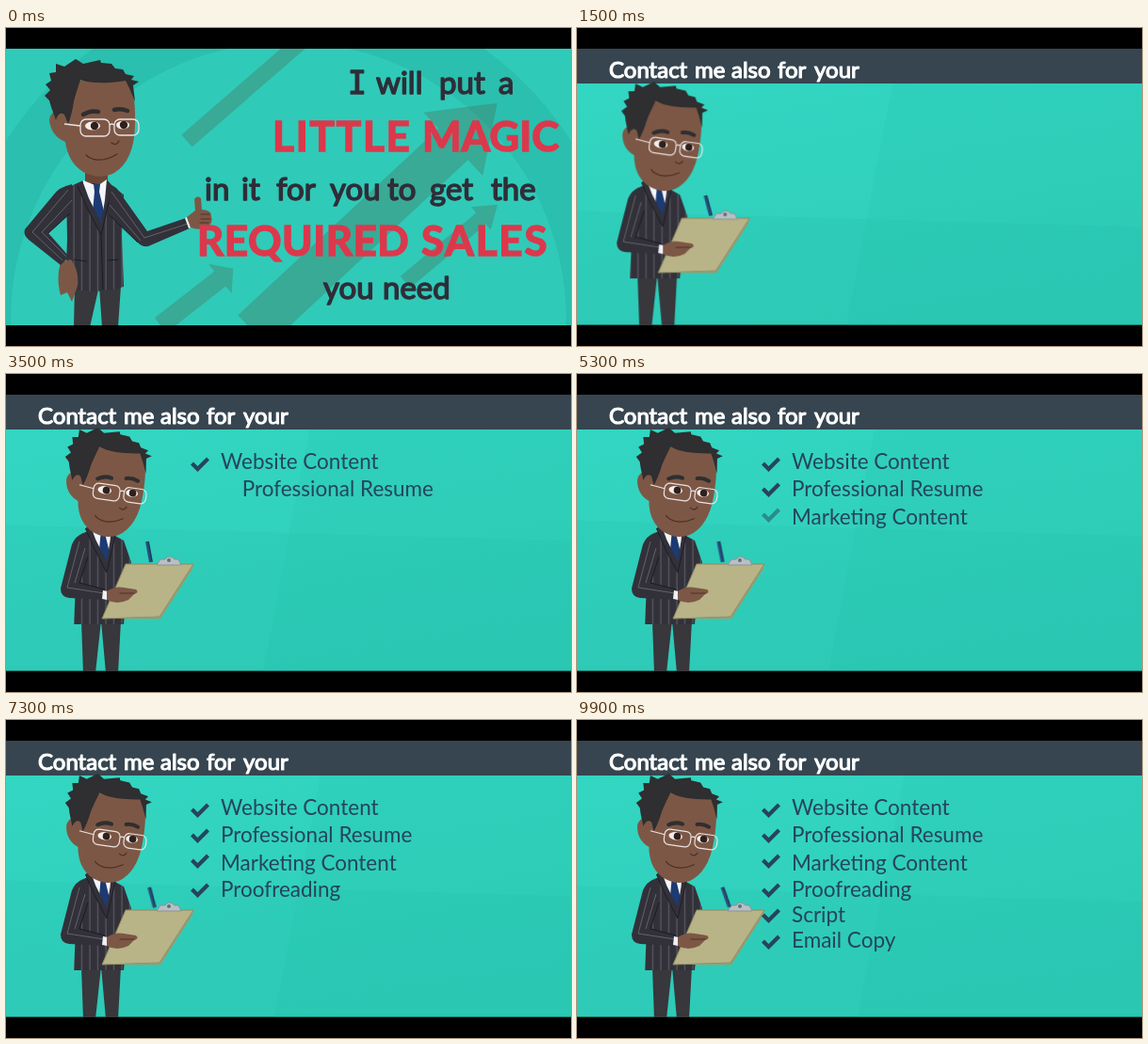
Write an HTML page that moves like this. It is 600 px wide and 338 px high and loops after 10000 ms.

```html
<!DOCTYPE html>
<html lang="en">
<head>
<meta charset="utf-8">
<title>Contact me</title>
<style>
html, body { margin: 0; width: 100%; height: 100%; overflow: hidden; background: #000; }
svg { display: block; width: 100vw; height: 100vh; --t: 0; }
text { font-family: Lato, sans-serif; }

.skin { fill: #7d5745; }
.neck { fill: #694637; }
.hair { fill: #2f2e30; }
.suit { fill: #32313a; }
.legs { fill: #37373c; }
.line { fill: none; stroke: #9a9aa3; stroke-width: .8; opacity: .6; }
.edge { fill: none; stroke: #1b1b22; stroke-width: 1; }
.crease { fill: none; stroke: #4b3026; stroke-width: 1.3; stroke-linecap: round; }
.brow { fill: none; stroke: #2f2e30; stroke-width: 4.5; stroke-linecap: round; }
.specs { fill: none; stroke: #e9e4e2; stroke-width: 1.3; }

/* marker-like lettering */
.hand { stroke-width: 1.5; stroke-linejoin: round; stroke-linecap: round; }
.dark { fill: #2f2e38; stroke: #2f2e38; font-size: 33px; }
.white { fill: #fff; stroke: #fff; font-size: 24px; stroke-width: 1.2; }
.serif { font-family: "DejaVu Sans Mono", monospace; font-size: 33px; }
.loud { fill: #dc384c; stroke: #dc384c; stroke-width: 1.5; font-size: 44px; font-weight: 700; }
.row { fill: #26455a; font-size: 22.5px; }
.tick { fill: none; stroke: #26455a; stroke-width: 4.2; }

/* every animation is paused and placed by --t */
.opening, .title, .writer, .pen, .shade, .floor, .row, .tick {
  animation: 10s linear calc((var(--s, 0) - var(--t)) * 1ms) both paused;
}
.opening { --s: 500; animation-name: leave; animation-duration: .5s; }
.title { --s: 600; animation-name: show; animation-duration: .4s; }
.writer { --s: 1150; animation-name: enter; animation-duration: .6s; }
.pen { animation-name: scribble; animation-duration: 1.45s; animation-iteration-count: infinite; }
.shade { animation-name: sway; }
.floor { animation-name: bob; }
.row { animation-name: slide; animation-duration: .55s; }
.tick { animation-name: show; animation-duration: .3s; }

@keyframes leave { to { opacity: 0; } }
@keyframes enter {
  from { transform: translate(-200px, 2px); animation-timing-function: cubic-bezier(.215, .61, .355, 1); }
  to { transform: none; }
}
@keyframes slide {
  from { transform: translateX(400px); animation-timing-function: cubic-bezier(.215, .61, .355, 1); }
  to { transform: none; }
}
@keyframes show { from { opacity: 0; } }
@keyframes scribble {
  0%, 8%, 100% { transform: translate(8px, -1px) rotate(-9deg); }
  40%, 85% { transform: none; }
}
@keyframes sway {
  0%, 15% { transform: translateX(5px); }
  35% { transform: translateX(-8px); }
  53% { transform: translateX(-14px); }
  73% { transform: translateX(4px); }
  100% { transform: translateX(18px); }
}
@keyframes bob {
  0%, 15% { transform: translateY(34px); }
  35% { transform: none; }
  53% { transform: translateY(-5px); }
  73% { transform: translateY(10px); }
  100% { transform: translateY(16px); }
}
</style>
</head>
<body>
<svg id="stage" viewBox="0 0 600 338" preserveAspectRatio="none">
  <defs>
    <linearGradient id="teal" x1="0" y1="0" x2=".3" y2="1">
      <stop offset="0" stop-color="#33d8c3"/>
      <stop offset="1" stop-color="#30cdb9"/>
    </linearGradient>
    <pattern id="pin" width="8.5" height="20" patternUnits="userSpaceOnUse">
      <rect class="suit" width="8.5" height="20"/>
      <path class="line" d="M4 0V20"/>
    </pattern>
    <clipPath id="frame"><rect y="22" width="600" height="293.500"/></clipPath>
    <path id="arrow" d="M0 -.1H.82V-.2L1 0L.82 .2V.1H0Z"/>

    <g id="head">
      <path class="skin" d="M64 56L131 54Q138 72 137 104Q136 141 115 154Q99 162 82 153Q66 143 63 121Q48 115 46 98Q48 84 62 90Z"/>
      <path class="hair" d="M53 98L48 84L46 77L41 72L47 66L42 60L48 56L46 48L53 47L53 38L62 41L74 33L82 38L100 34L101 37L112 38L116 43L124 44L127 49L136 51L133 55L141 57L135 61L137 78L131 64L127 56Q96 61 79 55Q74 70 72 78Q70 92 66 102L62 92Q56 88 53 98Z"/>
      <path class="brow" d="M82 92Q90 87 98 89M115 87Q122 85 129 88"/>
      <ellipse cx="92" cy="104" rx="8" ry="4.6" fill="#f3eeeb"/>
      <ellipse cx="124" cy="103" rx="7" ry="4.6" fill="#f3eeeb"/>
      <circle cx="94" cy="104" r="4.2" fill="#30201d"/>
      <circle cx="125" cy="103" r="4.2" fill="#30201d"/>
      <path class="skin" d="M83 103Q92 95 101 102L101 98H83ZM116 102Q124 95 132 102V97H116Z"/>
      <rect class="specs" x="79" y="97" width="31" height="18" rx="6"/>
      <rect class="specs" x="115" y="97" width="26" height="17" rx="6"/>
      <path class="specs" d="M110 103Q112.500 101 115 103M79 104L62 102"/>
      <path class="crease" d="M112 122Q117 126 120 120M85 135Q89 139 96 140Q107 141 118 134"/>
    </g>

    <g id="collar">
      <path fill="#f4f5f8" d="M82 162L97 168L107 161L111 173L101 208L80 171Z"/>
      <path fill="#1d3b73" d="M93 166H100L99 174L105 199L100 209L92 195L94 174Z"/>
      <path class="suit" d="M81 162L76 168L86 191L101 220V207L88 181Z"/>
      <path class="suit" d="M107 161L113 168L108 190L101 220V207L105 183Z"/>
      <path class="edge" d="M76 168L86 191L101 220L108 190L113 168"/>
    </g>
  </defs>

  <g clip-path="url(#frame)">
    <rect width="600" height="338" fill="url(#teal)"/>
    <path class="shade" d="M337 22L277 338H660V22Z" fill="#20b8a5" opacity=".13"/>
    <path class="floor" d="M-20 160L620 178V360H-20Z" fill="#20b8a5" opacity=".16"/>
    <rect y="22" width="600" height="37" fill="#36454f"/>

    <g class="writer">
      <path class="legs" d="M80 262H101L95 318H82ZM101 262H122L119 318H106Z"/>
      <path class="neck" d="M89 155H113V172L102 184L90 172Z"/>
      <path fill="url(#pin)" d="M84 168L76 174Q70 195 74 225L72 266H125L128 230L133 200L125 177L112 170Z"/>
      <use href="#collar" transform="translate(16 13) scale(.9)"/>
      <path fill="#b8b487" stroke="#8e8a63" d="M127 202H199L163 258L102 260Z"/>
      <path fill="#9c986e" d="M102 260L163 258L199 202L198 207L164 260Z"/>
      <path fill="#b9c0c3" stroke="#8a9397" d="M160 203L164 197H169Q173 191 179 197H183L186 203Z"/>
      <circle cx="173" cy="198" r="2" fill="#5f7378"/>
      <g class="pen" style="transform-origin:153px 201px">
        <path d="M150 178L154 200" fill="none" stroke="#27517d" stroke-width="4"/>
        <path d="M151 178L155 199" fill="none" stroke="#193657" stroke-width="1"/>
      </g>
      <path class="suit" d="M82 169Q74 172 70 181L58 228Q58 237 67 238L104 240L106 229L78 222L87 194Z"/>
      <path class="line" d="M78 178L65 227L104 233M84 185L73 222"/>
      <path class="edge" d="M87 194L78 222L105 229"/>
      <path fill="#eef0f3" d="M103 230L108 231L107 240L102 239Z"/>
      <path class="skin" d="M107 231Q116 225 125 227L138 229Q142 232 136 234L130 240Q118 246 107 240Z"/>
      <path class="crease" d="M121 233L136 233" opacity=".6"/>
      <use href="#head" transform="translate(35 18) rotate(8) scale(.91)"/>
    </g>

    <g id="list"></g>

    <g class="opening">
      <rect width="600" height="338" fill="#30cab8"/>
      <circle cx="300" cy="310" r="325" fill="none" stroke="#178f86" stroke-width="60" opacity=".2"/>
      <g fill="#47735c" opacity=".36">
        <use href="#arrow" transform="translate(262 322) rotate(-43) scale(355 230)"/>
        <use href="#arrow" transform="translate(192 120) rotate(-41) scale(230 85)"/>
        <use href="#arrow" transform="translate(164 316) rotate(-38) scale(98 100)"/>
        <use href="#arrow" transform="translate(424 270) rotate(-40) scale(128 80)"/>
      </g>

      <path class="legs" d="M73 274H99L89 318H72ZM99 274H122L119 318H102Z"/>
      <path class="neck" d="M84 148H108V168L96 181L84 168Z"/>
      <path fill="url(#pin)" d="M80 163L64 170L65 225L63 276Q95 284 125 275L123 220L125 177L112 168Z"/>
      <use href="#collar"/>
      <path class="edge" d="M101 220L103 278M72 246L86 248M108 247L119 246"/>
      <path class="skin" d="M58 249L69 246Q78 258 76 274L70 291L65 281L58 284Q53 266 58 249Z"/>
      <path class="suit" d="M70 166Q56 169 50 178L20 214Q18 220 24 225L58 252L67 243L45 218L68 197Z"/>
      <path class="line" d="M66 172L28 217L60 247M70 183L38 217L64 243"/>
      <path class="suit" d="M109 166Q118 168 123 178L150 216L191 202L195 213L151 232Q144 233 140 228L110 199Z"/>
      <path class="line" d="M112 174L147 223L193 208M110 188L143 226"/>
      <path class="edge" d="M68 197L45 218M110 199L140 228"/>
      <path fill="#eef0f3" d="M190 202L192 201L196 212L194 213Z"/>
      <path class="skin" d="M192 201L201 194L200 182Q203 177 207 181L208 193Q219 194 218 200Q220 208 214 211Q205 216 196 212Z"/>
      <path class="crease" d="M207 198H216M207 203H217M206 207H215" opacity=".6"/>
      <use href="#head"/>

      <text class="hand dark" y="70"><tspan class="serif" x="363">I</tspan> <tspan x="393">will</tspan> <tspan x="460">put</tspan> <tspan x="523">a</tspan></text>
      <text class="loud" y="131"><tspan x="283" letter-spacing="1.8">LITTLE</tspan> <tspan x="442">MAGIC</tspan></text>
      <text class="hand dark" y="183"><tspan x="211">in</tspan> <tspan x="250">it</tspan> <tspan x="287">for</tspan> <tspan x="344">you</tspan> <tspan x="405">to</tspan> <tspan x="450">get</tspan> <tspan x="515">the</tspan></text>
      <text class="loud" y="242"><tspan x="203" letter-spacing=".5">REQUIRED</tspan> <tspan x="441" letter-spacing="1.8">SALES</tspan></text>
      <text class="hand dark" y="288"><tspan x="337">you</tspan> <tspan x="400">need</tspan></text>
    </g>

    <text class="title hand white" y="53"><tspan x="34">Contact</tspan> <tspan x="125">me</tspan> <tspan x="164">also</tspan> <tspan x="213">for</tspan> <tspan x="252">your</tspan></text>
  </g>
</svg>
<script>
const stage = document.getElementById('stage');
const list = document.getElementById('list');

// label, baseline, tick height, start of the slide in ms
const rows = [
  ['Website Content', 101, 95, 1850],
  ['Professional Resume', 130, 122, 3150],
  ['Marketing Content', 160, 149, 4550],
  ['Proofreading', 188, 180, 5950],
  ['Script', 215, 207, 7400],
  ['Email Copy', 242, 235, 8850]
];

list.innerHTML = rows.map(([label, y, mid, start]) => `
  <path class="tick" style="--s:${start + 600}" d="M197.500 ${mid}l6 6l11 -11"/>
  <text class="row" style="--s:${start}" x="228" y="${y}">${label}</text>`).join('');

const LOOP = 10000, STEP = 100;
const begin = performance.now();

function draw(now) {
  const t = Math.max(0, now - begin) % LOOP;
  stage.style.setProperty('--t', Math.floor(t / STEP) * STEP);
  requestAnimationFrame(draw);
}
requestAnimationFrame(draw);
</script>
</body>
</html>
```
